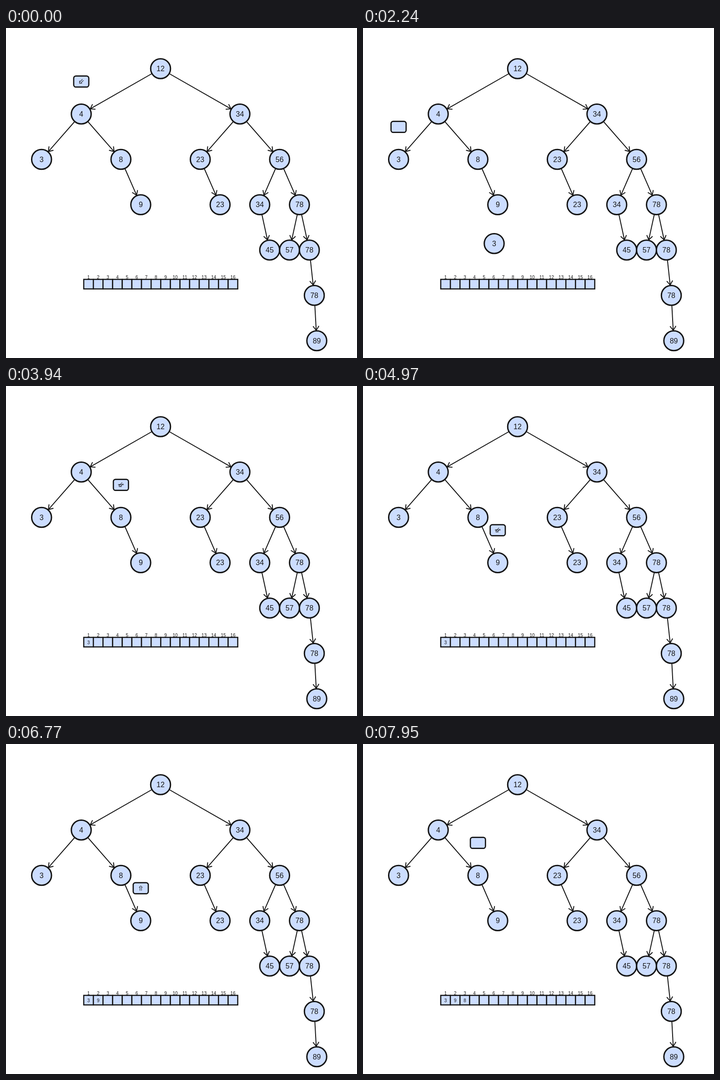
An HTML page with a canvas for the animation above (8000 ms loop, 772 by 726 pixels).

```html
<!DOCTYPE html>
<html lang="en">
<head>
<meta charset="utf-8">
<title>Postorder traversal</title>
<style>
  html, body { margin: 0; width: 100%; height: 100%; overflow: hidden; background: #fff; }
  canvas { display: block; }
</style>
</head>
<body>
<canvas id="stage" width="772" height="726"></canvas>
<script>
const ctx = document.getElementById('stage').getContext('2d');
const INK = '#141414', FILL = '#ccddff';
const LOOP = 8000, RADIUS = 21.8, CELL = 21.17;
const ROOT = { x: 340, y: 89.5 }, SPREAD = 174.5, ROW = 99.75;
const DROP = { x: 340.5, y: 520 };

// Binary search tree, laid out by halving the spread on every level
const nodes = [];
function insert(value) {
  let x = ROOT.x, y = ROOT.y, spread = SPREAD, parent = null, node = nodes[0];
  while (node) {
    parent = node;
    const side = value < node.value ? 'left' : 'right';
    x += side === 'left' ? -spread : spread;
    y += ROW;
    spread /= 2;
    node = parent[side];
    if (!node) parent[side] = { value, x, y, parent };
    if (!node) return nodes.push(parent[side]);
  }
  nodes.push({ value, x, y, parent });
}
[12, 4, 34, 3, 8, 9, 23, 23, 56, 34, 45, 78, 57, 78, 78, 89].forEach(insert);
const find = value => nodes.find(n => n.value === value);

// Badge moves: start, end, node reached
const moves = [
  [0, 0, 4], [310, 440, 3], [3045, 3200, 4], [3505, 3638, 8], [4535, 4658, 9], [7105, 7255, 8]
];
// Badge symbol: time, arrow turn in degrees (null = empty), struck through
const DOWN_LEFT = 225, DOWN_RIGHT = 135, UP = 0;
const symbols = [
  [0, DOWN_LEFT], [700, DOWN_LEFT, true], [990, DOWN_RIGHT], [1300, DOWN_RIGHT, true],
  [1580, null], [2750, UP], [3210, DOWN_RIGHT],
  [3640, DOWN_LEFT], [3940, DOWN_LEFT, true], [4240, DOWN_RIGHT],
  [4660, DOWN_LEFT], [4970, DOWN_LEFT, true], [5260, DOWN_RIGHT], [5560, DOWN_RIGHT, true],
  [5840, null], [6770, UP], [7260, null]
];
// Copied nodes: value, leaves, arrives, written to the array
const copies = [[3, 1958, 2311, 2470], [9, 6212, 6351, 6480], [8, 7532, 7781, 7950]];

const clamp = v => Math.max(0, Math.min(1, v));
const mix = (a, b, p) => a + (b - a) * p;
const latest = (list, t) => list.filter(item => item[0] <= t).pop();

function text(str, x, y, size) {
  ctx.font = size + 'px "Liberation Sans", Arial, sans-serif';
  ctx.textAlign = 'center';
  ctx.fillStyle = INK;
  ctx.fillText(str, x, y);
}

function line(width, ...points) {
  ctx.lineWidth = width;
  ctx.beginPath();
  points.forEach(([x, y]) => ctx.lineTo(x, y));
  ctx.stroke();
}

function paint(width) {
  ctx.lineWidth = width;
  ctx.fillStyle = FILL;
  ctx.fill();
  ctx.stroke();
}

function drawNode(value, x, y) {
  ctx.beginPath();
  ctx.arc(x, y, RADIUS, 0, 2 * Math.PI);
  paint(3);
  text(value, x, y + 5.5, 16);
}

function drawEdge(from, to) {
  const angle = Math.atan2(to.y - from.y, to.x - from.x);
  const at = (p, a, r) => [p.x - r * Math.cos(a), p.y - r * Math.sin(a)];
  const tip = at(to, angle, RADIUS + 1);
  const barb = turn => at({ x: tip[0], y: tip[1] }, angle + turn, 11.5);
  line(2, [from.x, from.y], tip);
  line(2, barb(-0.6), tip, barb(0.6));
}

function drawArray(t) {
  for (let i = 0; i < 16; i++) {
    const x = 171 + i * CELL, middle = x + CELL / 2;
    ctx.beginPath();
    ctx.rect(x, 553, CELL, 21);
    paint(2.5);
    text(i + 1, middle, 551.5, 10);
    const copy = copies[i];
    if (copy && t >= copy[3]) text(copy[0], middle, 567.5, 10);
  }
}

function drawBadge(t) {
  const i = moves.filter(m => m[0] <= t).length - 1;
  const [start, end, value] = moves[i];
  const to = find(value), from = i ? find(moves[i - 1][2]) : to;
  const p = i ? clamp((t - start) / (end - start)) : 1;
  const [, turn, struck] = latest(symbols, t);
  ctx.save();
  ctx.translate(mix(from.x, to.x, p), mix(from.y, to.y, p) - 71.5);
  ctx.beginPath();
  ctx.roundRect(-16.6, -12.2, 33.2, 24.4, 5);
  paint(2.7);
  if (struck) line(1, [-6.5, -0.4], [6.5, -0.4]);
  if (turn !== null) {
    ctx.rotate(turn * Math.PI / 180);
    line(1, [-4, -1.2], [0, -5.5], [4, -1.2]);
    line(1, [-1.7, -3.5], [-1.7, 5.5]);
    line(1, [1.7, -3.5], [1.7, 5.5]);
  }
  ctx.restore();
}

function drawCopy(t, [value, leave, arrive, done]) {
  if (t < leave || t >= done) return;
  const from = find(value), p = clamp((t - leave) / (arrive - leave));
  ctx.globalAlpha = 1 - clamp((t - arrive) / (done - arrive));
  drawNode(value, mix(from.x, DROP.x, p), mix(from.y, DROP.y, p));
  ctx.globalAlpha = 1;
}

function draw(t) {
  ctx.fillStyle = '#fff';
  ctx.fillRect(0, 0, 772, 726);
  ctx.strokeStyle = INK;
  nodes.forEach(n => n.parent && drawEdge(n.parent, n));
  nodes.forEach(n => drawNode(n.value, n.x, n.y));
  drawArray(t);
  drawBadge(t);
  copies.forEach(copy => drawCopy(t, copy));
}

const begin = performance.now();
function tick() {
  draw((performance.now() - begin) % LOOP);
  requestAnimationFrame(tick);
}
tick();
</script>
</body>
</html>
```
